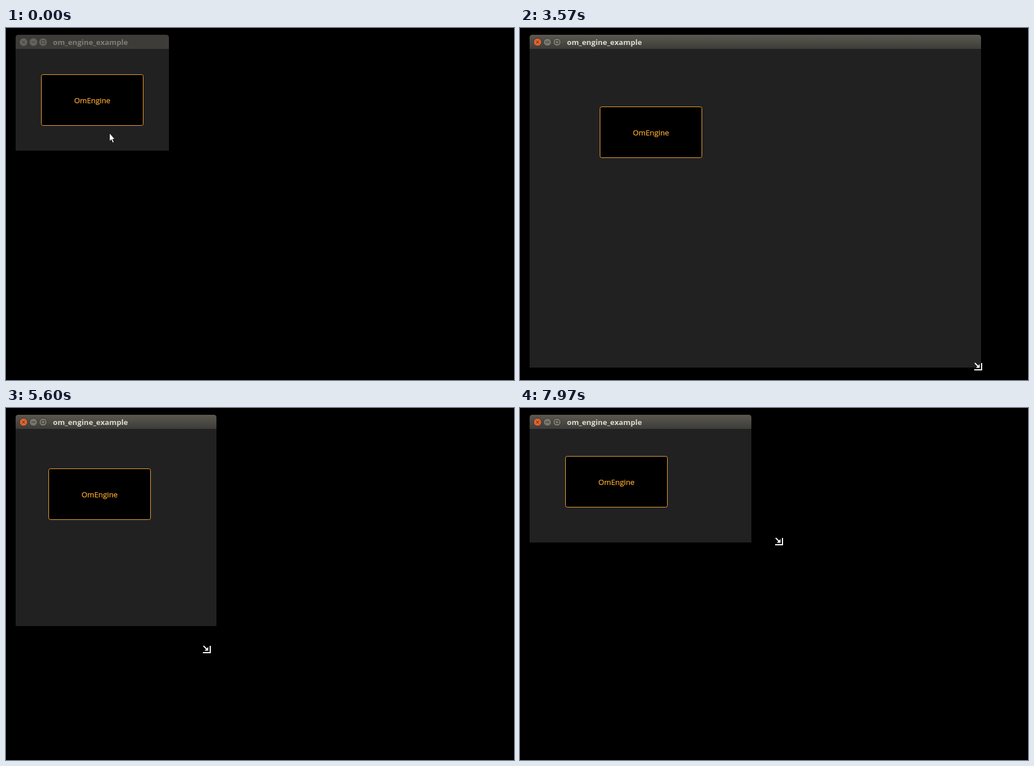
Write an HTML page that moves like this. It is 898 px wide and 623 px high and loops after 8 s.

```html
<!DOCTYPE html>
<html lang="en">
<head>
<meta charset="utf-8">
<title>om_engine_example</title>
<style>
  html, body { margin: 0; width: 100%; height: 100%; overflow: hidden; background: #000; }
  svg { display: block; width: 898px; height: 623px; }
  text { font-family: "Open Sans", "Noto Sans", sans-serif; font-size: 13.2px; }
</style>
</head>
<body>
<svg viewBox="0 0 898 623">
  <defs>
    <linearGradient id="bar" x1="0" y1="0" x2="0" y2="1">
      <stop offset="0" stop-color="#5a5850"/>
      <stop offset="1" stop-color="#3d3c38"/>
    </linearGradient>
  </defs>
  <path id="titleBar"/>
  <rect id="content" x="17" y="37" fill="#212122"/>
  <g id="controls" stroke-width="1">
    <circle id="close" cx="31" cy="25" r="7"/>
    <circle cx="48.5" cy="25" r="7"/>
    <circle cx="65.5" cy="25" r="7"/>
    <path id="glyphs" fill="none" d="M28.5 22.5l5 5m0-5l-5 5M45 25h7M62.5 22.5h6v5h-6z"/>
  </g>
  <text id="title" x="83" y="29.5" font-weight="700">om_engine_example</text>
  <g id="box">
    <rect x=".5" y=".5" width="180" height="90" rx="3" fill="#000" stroke="#f2a53a"/>
    <text x="90.5" y="51" text-anchor="middle" fill="#f9a92e" stroke="#f9a92e" stroke-width=".25">OmEngine</text>
  </g>
  <path id="arrow" fill="#fff" stroke="#000" stroke-width=".8"
    d="M0 0V14.5L3.2 11.6L5.6 17.3L8 16.2L5.6 10.8H9.5Z"/>
  <g id="grip">
    <path fill="none" stroke="#000" stroke-width="4" d="M-1 -13V-1H-14"/>
    <path fill="none" stroke="#fff" stroke-width="2" d="M-1 -13V-1H-14M-13 -13L-7 -7"/>
    <path fill="#fff" d="M-4.5 -11V-4.5H-11Z"/>
  </g>
</svg>
<script>
const LOOP = 8000, FOCUS_AT = 1230, GRIP_AT = 860, LAG = 80;
const LEFT = 17, TOP = 37, BASE_W = 271, BASE_H = 180;
const $ = id => document.getElementById(id);

// Key points: time, x, y
const approach = [[30, 183, 186], [520, 294, 225], [830, 281, 205]];
const drag = [
  [1230, 290, 222], [2430, 321, 494], [2700, 350, 505], [3200, 620, 628],
  [3480, 817, 606], [3700, 817, 606], [4230, 467, 462], [4900, 520, 495],
  [5600, 525, 420], [6250, 467, 385], [6470, 446, 317], [6670, 470, 430],
  [7060, 419, 315], [7500, 290, 222], [7890, 411, 243], [8000, 486, 243]
];
// The dragging hand also circles anticlockwise for a while
const swirl = { rx: 165, ry: 90, period: 870, rightAt: 6014, begin: 4270, end: 7250 };

// Monotone cubic interpolation: key values are never overshot
function sample(path, t, axis) {
  const last = path.length - 1;
  if (t <= path[0][0]) return path[0][axis];
  if (t >= path[last][0]) return path[last][axis];
  const slope = i => (path[i + 1][axis] - path[i][axis]) / (path[i + 1][0] - path[i][0]);
  const tangent = i => {
    if (i === 0) return 0;
    if (i === last) return slope(i - 1);
    const a = slope(i - 1), b = slope(i);
    return a * b <= 0 ? 0 : 2 * a * b / (a + b);
  };
  const i = path.findIndex(p => p[0] > t) - 1;
  const span = path[i + 1][0] - path[i][0], u = (t - path[i][0]) / span, v = 1 - u;
  return path[i][axis] * v * v * (1 + 2 * u) + path[i + 1][axis] * u * u * (3 - 2 * u)
    + span * u * v * (v * tangent(i) - u * tangent(i + 1));
}

function smooth(from, to, t) {
  const u = Math.min(1, Math.max(0, (t - from) / (to - from)));
  return u * u * (3 - 2 * u);
}

function gripAt(t) {
  const { rx, ry, period, rightAt, begin, end } = swirl;
  const size = smooth(begin, begin + 630, t) * (1 - smooth(end - 350, end, t));
  const angle = 2 * Math.PI * (t - rightAt) / period;
  return [
    Math.round(sample(drag, t, 1) + size * rx * Math.cos(angle)),
    Math.round(sample(drag, t, 2) - size * ry * Math.sin(angle))
  ];
}

function place(node, x, y) {
  node.setAttribute("transform", `translate(${Math.round(x)} ${Math.round(y)})`);
}

function setFocus(on) {
  $("titleBar").setAttribute("fill", on ? "url(#bar)" : "#3d3c39");
  $("title").setAttribute("fill", on ? "#dfdbd2" : "#817e75");
  $("controls").setAttribute("fill", on ? "#77756d" : "#65635d");
  $("controls").setAttribute("stroke", on ? "#35342f" : "#484741");
  $("close").setAttribute("fill", on ? "#e4622f" : "#65635d");
  $("glyphs").setAttribute("stroke", on ? "#35342f" : "#3d3c39");
}

function draw(t) {
  // The window corner trails the pointer
  const [cornerX, cornerY] = gripAt(t - LAG);
  const width = cornerX - 2 - LEFT, height = cornerY - 5 - TOP;
  setFocus(t >= FOCUS_AT);
  $("titleBar").setAttribute("d", `M${LEFT} 37V17q0-5 5-5h${width - 10}q5 0 5 5V37z`);
  $("content").setAttribute("width", width);
  $("content").setAttribute("height", height);
  place($("box"), LEFT + 44.9 + 0.15 * (width - BASE_W), TOP + 44.55 + 0.15 * (height - BASE_H));

  const gripping = t >= GRIP_AT;
  $("arrow").style.display = gripping ? "none" : "";
  $("grip").style.display = gripping ? "" : "none";
  if (gripping) place($("grip"), ...gripAt(t));
  else place($("arrow"), sample(approach, t, 1), sample(approach, t, 2));
}

const start = performance.now();
function tick() {
  draw((performance.now() - start) % LOOP);
  requestAnimationFrame(tick);
}
tick();
</script>
</body>
</html>
```
